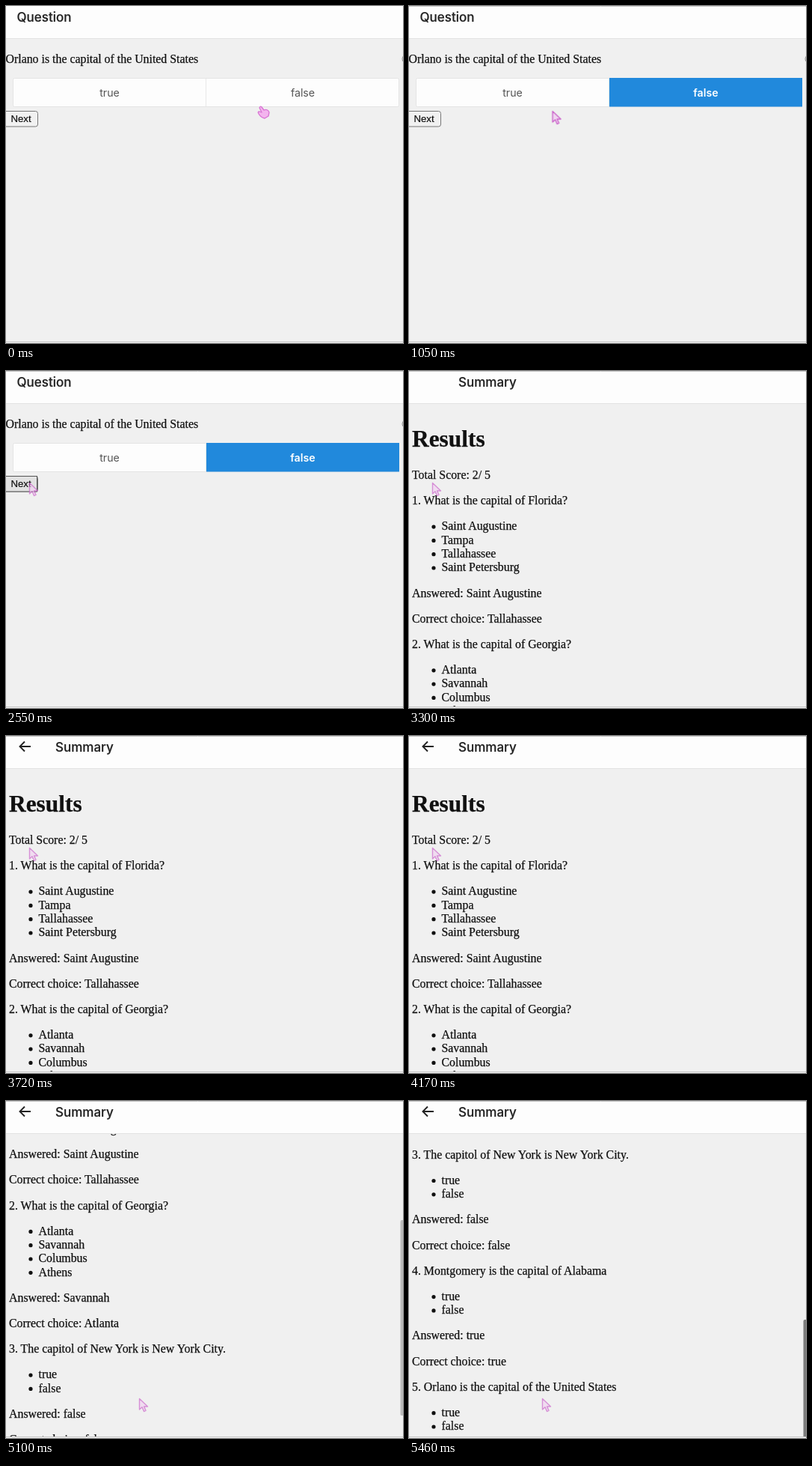
An HTML page that plays this animation: 531x450 px, repeating every 5.49 s.

```html
<!DOCTYPE html>
<html lang="en">
<head>
<meta charset="utf-8">
<title>Quiz</title>
<style>
  html, body { margin: 0; width: 100%; height: 100%; overflow: hidden; background: #f0f0f0; }
  svg { display: block; width: 531px; height: 450px; }
  .serif { font: 15.87px "Liberation Serif", "Times New Roman", serif; fill: #111; }
  text.serif, .serif text { stroke: #111; stroke-width: .25px; }
  .title { font: 500 17px Inter, sans-serif; fill: #222; stroke: #222; stroke-width: .2px; }
  .option { font: 14.2px Inter, sans-serif; fill: #555; text-anchor: middle; }
  .picked { font-weight: 600; fill: #fff; }
  .button { font: 13.2px "Liberation Sans", Arial, sans-serif; fill: #111; stroke: #111; stroke-width: .2px; }
  .heading { font-size: 31.4px; font-weight: bold; }

  /* Hard state changes */
  .step { animation: 5490ms step-end infinite; }
  .quiz { animation-name: quiz; }
  .summary { animation-name: summary; }
  .back { animation-name: back; }
  .answer { animation-name: answer; }
  .press { animation-name: press; }
  .hand { animation-name: hand; }
  .arrow { animation-name: arrow; }
  .edge { animation-name: edge; }
  @keyframes quiz { 0% { visibility: visible } 54.64%, 100% { visibility: hidden } }
  @keyframes summary { 0% { visibility: hidden } 54.64%, 100% { visibility: visible } }
  @keyframes back { 0% { opacity: 0 } 63.8%, 100% { opacity: 1 } }
  @keyframes answer { 0% { opacity: 0 } 9.11%, 100% { opacity: 1 } }
  @keyframes press { 0% { opacity: 0 } 45.36% { opacity: 1 } 49.2%, 100% { opacity: 0 } }
  @keyframes hand { 0% { opacity: 1 } 15.5%, 100% { opacity: 0 } }
  @keyframes arrow { 0% { opacity: 0 } 15.5% { opacity: 1 } 27.32%, 100% { opacity: .7 } }
  @keyframes edge { 0% { opacity: 0 } 1.09%, 100% { opacity: 1 } }

  /* Movement */
  .cursor { animation: move 5490ms ease-in-out infinite; }
  .page { animation: scroll 5490ms infinite; }
  .thumb { animation: thumb 5490ms infinite; }
  @keyframes move {
    0% { transform: translate(338px, 134px) }
    5.5%, 12% { transform: translate(343px, 124px); animation-timing-function: ease-in }
    19.13% { transform: translate(192px, 140px); animation-timing-function: ease-out }
    27.32%, 79.2% { transform: translate(31px, 149px) }
    84.7%, 100% { transform: translate(178px, 397px) }
  }
  @keyframes scroll {
    0%, 87.4% { transform: translateY(0); animation-timing-function: ease-in-out }
    98.9%, 100% { transform: translateY(-485px) }
  }
  @keyframes thumb {
    0%, 87.4% { transform: translateY(0); opacity: 0; animation-timing-function: ease-in-out }
    98.9%, 100% { transform: translateY(248px); opacity: 1 }
  }
</style>
</head>
<body>
<svg viewBox="0 0 531 450">
  <defs><clipPath id="body"><rect y="44" width="531" height="406"/></clipPath></defs>
  <rect width="531" height="450" fill="#f0f0f0"/>

  <g class="step quiz">
    <text class="serif" x="-.5" y="76">Orlano is the capital of the United States</text>
    <path d="M532 66q-4 5 0 9" fill="none" stroke="#888"/>
    <rect x="9.5" y="96.5" width="516" height="38" rx="2" fill="#fdfdfd" stroke="#e4e4e4"/>
    <path d="M267.5 97v37" stroke="#e8e8e8"/>
    <text class="option" x="138.5" y="120.5">true</text>
    <text class="option" x="397" y="120.5">false</text>
    <g class="step answer">
      <rect x="268" y="96" width="258" height="38.5" fill="#2189dc"/>
      <text class="option picked" x="397" y="120.5">false</text>
    </g>
    <rect x="-4.5" y="140.5" width="47" height="20.5" rx="3" fill="#f1f1f1" stroke="#777"/>
    <rect class="step press" x="-4.5" y="140.5" width="46" height="20.5" fill="#e2e2e2" stroke="#555"/>
    <text class="button" x="6.5" y="155">Next</text>
  </g>

  <g class="step summary">
    <g clip-path="url(#body)">
      <g class="page serif" id="page"></g>
      <rect class="thumb" x="527.5" y="44" width="5" height="261" rx="2" fill="#7c7c7c"/>
    </g>
  </g>

  <rect width="531" height="43" fill="#fdfdfd"/>
  <path d="M0 43.5h531" stroke="#e2e2e2"/>
  <path class="step edge" d="M0 .5h531" stroke="#c8c8c8"/>
  <text class="title step quiz" x="14.5" y="20.5">Question</text>
  <g class="step summary">
    <path class="step back" d="M33 14H19M25 7.5L18.5 14L25 20.5" fill="none" stroke="#222" stroke-width="1.9"/>
    <text class="title" x="66" y="20.5">Summary</text>
  </g>
  <rect y="449" width="531" height="1" fill="#f6f6f6"/>
  <path d="M0 448.5h531" stroke="#c6c6c6"/>

  <g class="cursor" stroke-linejoin="round">
    <path class="step hand" d="M1 2Q2-1 4 1L7 5Q12 3 14 8L13 13L8 16Q3 15 0 10Q-2 7 1 7L4 8Z" fill="#f3b4ee" stroke="#d873d3" stroke-width="1.3"/>
    <path class="step arrow" d="M.5 .5V15L4 11.8L6.5 17.5L9 16.4L6.6 11H11.5Z" fill="#f0d4f0" stroke="#cb66cb" stroke-width="1.4"/>
  </g>
</svg>
<script>
  const LINE = 18.3, GAP = 34.2;
  const bool = ["true", "false"];
  const questions = [
    ["What is the capital of Florida?", ["Saint Augustine", "Tampa", "Tallahassee", "Saint Petersburg"], "Saint Augustine", "Tallahassee"],
    ["What is the capital of Georgia?", ["Atlanta", "Savannah", "Columbus", "Athens"], "Savannah", "Atlanta"],
    ["The capitol of New York is New York City.", bool, "false", "false"],
    ["Montgomery is the capital of Alabama", bool, "true", "true"],
    ["Orlano is the capital of the United States", bool, "false", "true"]
  ];

  const text = (x, y, s, cls = "") => `<text class="${cls}" x="${x}" y="${y}">${s}</text>`;
  let y = 144;
  let out = text(4, 101, "Results", "heading") + text(4, y, "Total Score: 2/ 5");
  const para = s => { y += GAP; out += text(4, y, s); };

  questions.forEach(([title, choices, given, correct], i) => {
    para(`${i + 1}. ${title}`);
    y += GAP - LINE;
    for (const choice of choices) {
      y += LINE;
      out += `<circle cx="33" cy="${y - 4.3}" r="2.6"/>` + text(43.5, y, choice);
    }
    para(`Answered: ${given}`);
    para(`Correct choice: ${correct}`);
  });
  document.getElementById("page").innerHTML = out;
</script>
</body>
</html>
```
